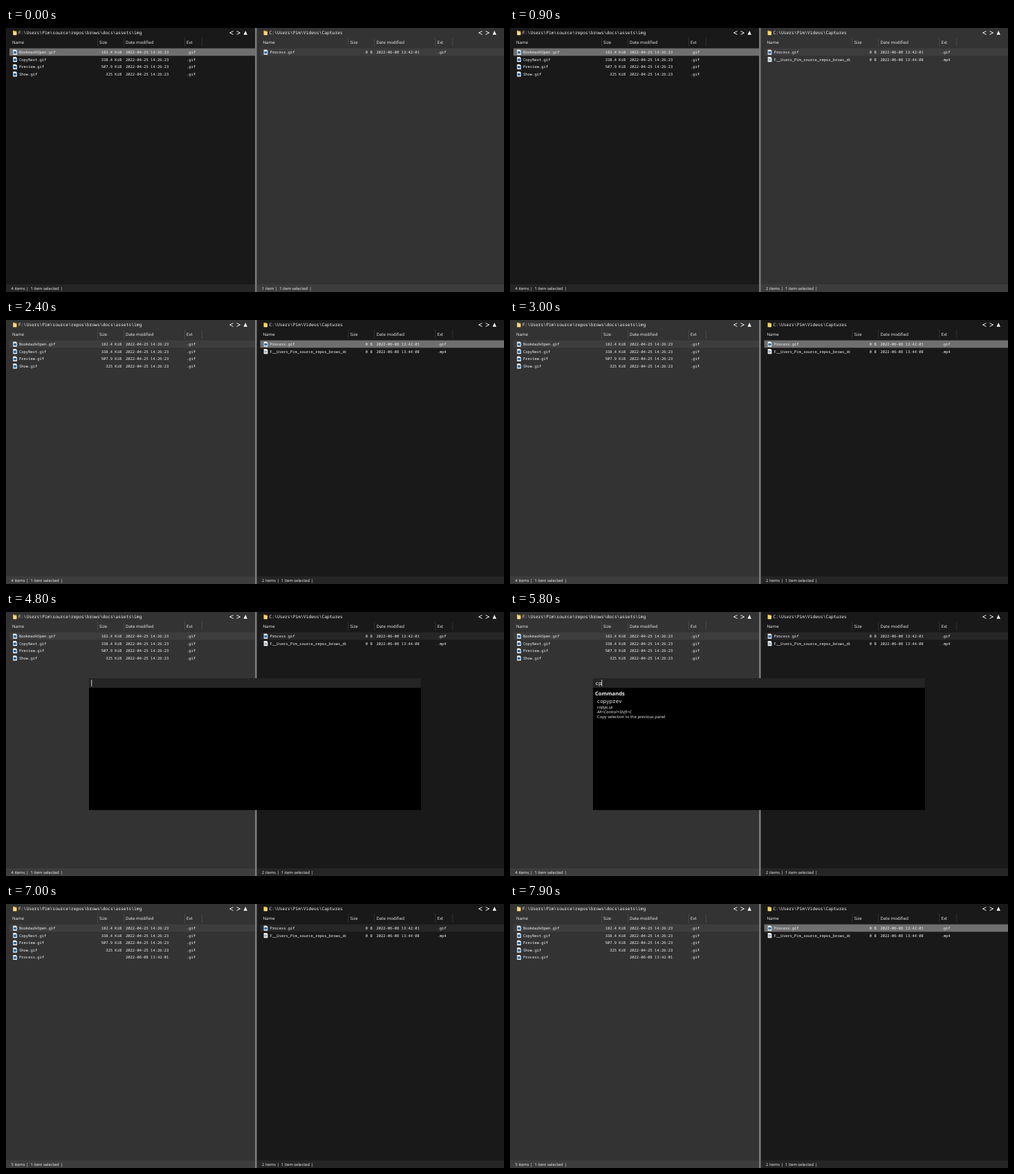
An HTML page that plays this animation: 720x383 px, repeating every 8000 ms.

```html
<!DOCTYPE html>
<html lang="en">
<head>
<meta charset="utf-8">
<title>Two-panel file browser</title>
<style>
  html, body { margin: 0; width: 100%; height: 100%; overflow: hidden; background: #191919; }
  svg { display: block; width: 720px; height: 383px; }
  text { fill: #f4f4f4; font: 6.1px "Open Sans", "Noto Sans", sans-serif; text-rendering: geometricPrecision; white-space: pre; }
  .mono { font: 5.48px "Noto Sans Mono", "DejaVu Sans Mono", monospace; }
  .path { font-size: 6.34px; }
  .input { font-size: 7.5px; }
  .small { font-size: 5.85px; }
  .it { font-style: italic; }
  .title { font-size: 7.65px; font-weight: bold; }
  .end { text-anchor: end; }
</style>
</head>
<body>
<svg id="stage" viewBox="0 0 720 383">
  <defs><clipPath id="nameCol"><rect x="0" y="28" width="129.5" height="340"/></clipPath></defs>
  <g id="scene"></g>
</svg>
<script>
const LOOP = 8000, ROW = 10.6;
const FILE_ADDED = 100, SWITCH = 2400, OPEN = 4800, TYPE_C = 5600, TYPE_P = 5800, CLOSE = 7000, REFOCUS = 7300;
const CARET_OFF = [[5300, TYPE_C], [6300, 6800]];

const assets = [
  ['BookmarkOpen', '182.4 KiB'], ['CopyNext', '338.4 KiB'], ['Preview', '507.9 KiB'], ['Show', '325 KiB']
].map(([name, size]) => ({ name: name + '.gif', size, date: '2022-04-25 14:26:23', ext: '.gif' }));
const recording = { name: 'Process.gif', size: '0 B', date: '2022-06-08 13:42:01', ext: '.gif' };
const copied = { ...recording, size: '' };
const video = { name: 'F__Users_Pim_source_repos_brows_docs_assets_img.mp4', size: '0 B', date: '2022-06-08 13:44:08', ext: '.mp4' };

const text = (x, y, s, cls = '') => `<text x="${x}" y="${y}" class="${cls}">${s}</text>`;
const rect = (x, y, w, h, fill) => `<rect x="${x}" y="${y}" width="${w}" height="${h}" fill="${fill}"/>`;
const shape = (d, fill, stroke = 'none') => `<path d="${d}" fill="${fill}" stroke="${stroke}"/>`;

function fileIcon(y, ext) {
  const page = shape(`M10.2 ${y}h4.2l1.5 1.5v5.7h-5.7z`, '#f2f2f2');
  return page + (ext === '.gif'
    ? rect(11, y + 2.3, 4, 3.4, '#2c6ea8')
    : rect(11.2, y + 2.4, 3.2, 3, '#8ba3b5'));
}

function fileRow(file, i) {
  const y = 36.9 + i * ROW;
  return fileIcon(y - 5.4, file.ext) +
    `<g clip-path="url(#nameCol)">${text(19, y, file.name, 'mono')}</g>` +
    text(167.2, y, file.size, 'mono end') +
    text(173, y, file.date, 'mono') +
    text(261, y, file.ext, 'mono');
}

function status(count) {
  const items = count + (count === 1 ? ' item' : ' items');
  const part = (dx, s) => `<tspan dx="${dx}">${s}</tspan>`;
  return text(7.6, 380.1, items + part(1.7, '|') + part(3, '1 item selected') + part(2.2, '|'), 'small');
}

function panel(x, width, navX, path, files, active, focused) {
  const rowFill = focused ? '#6f6f6f' : active ? '#262626' : '#3d3d3d';
  const columns = [[9, 'Name'], [135, 'Size'], [173, 'Date modified'], [261, 'Ext']];
  return `<g transform="translate(${x})">` +
    rect(0, 0, width, 383, active ? '#191919' : '#333') +
    rect(0, 372, width, 11, active ? '#252525' : '#3d3d3d') +
    shape('M10 3.8h2.2l.7.8h2.4v5.6H10z', '#e9b94c') + rect(11, 5.6, 4.3, 4.6, '#ffdc7c') +
    text(18, 9.2, path, 'mono path') +
    shape(`M${navX + 5} 4.6l-5 2.4l5 2.4M${navX + 10} 4.6l5 2.4l-5 2.4`, 'none', '#eee') +
    shape(`M${navX + 20} 9.7l2.7-5.8l2.7 5.8z`, '#fff') +
    columns.map(([cx, s]) => text(cx, 23.2, s)).join('') +
    [132, 170, 258, 283].map(cx => rect(cx, 14, .7, 13, '#ffffff26')).join('') +
    rect(5, 29.5, width - 5, 10.8, rowFill) +
    files.map(fileRow).join('') + status(files.length) + '</g>';
}

function palette(t) {
  const typed = t < TYPE_C ? '' : t < TYPE_P ? 'c' : 'cp';
  const caretOn = !CARET_OFF.some(([from, to]) => t >= from && t < to);
  let out = rect(120, 96, 480, 191.3, '#000') + rect(120, 96, 480, 14, '#242424') +
    text(123.6, 105.5, typed, 'mono input');
  if (caretOn) out += rect(123.4 + typed.length * 4.5, 98.3, .8, 9.5, '#fff');
  if (typed === 'cp') {
    out += text(123, 120.7, 'Commands', 'title') +
      text(125.8, 132.2, 'copyprev', 'mono input') +
      text(126, 139.8, 'copyp,cp', 'small it') +
      text(126, 146.9, 'Alt+Control+Shift+C', 'small it') +
      text(126, 154, 'Copy selection to the previous panel', 'small');
  }
  return out;
}

function scene(t) {
  const rightActive = t >= SWITCH;
  const open = t >= OPEN && t < CLOSE;
  const rightFocused = rightActive && (t < OPEN || t >= REFOCUS);
  const left = t < CLOSE ? assets : [...assets, copied];
  const right = t < FILE_ADDED ? [recording] : [recording, video];
  return panel(0, 360, 323.5, 'F:\\Users\\Pim\\source\\repos\\brows\\docs\\assets\\img', left, !rightActive, !rightActive) +
    panel(362.5, 357.5, 321, 'C:\\Users\\Pim\\Videos\\Captures', right, rightActive, rightFocused) +
    rect(360, 0, 2.7, 383, '#777') +
    (open ? palette(t) : '');
}

const root = document.getElementById('scene');
let shown = '';
function frame() {
  const next = scene(performance.now() % LOOP);
  if (next !== shown) root.innerHTML = shown = next;
  requestAnimationFrame(frame);
}
frame();
</script>
</body>
</html>
```
